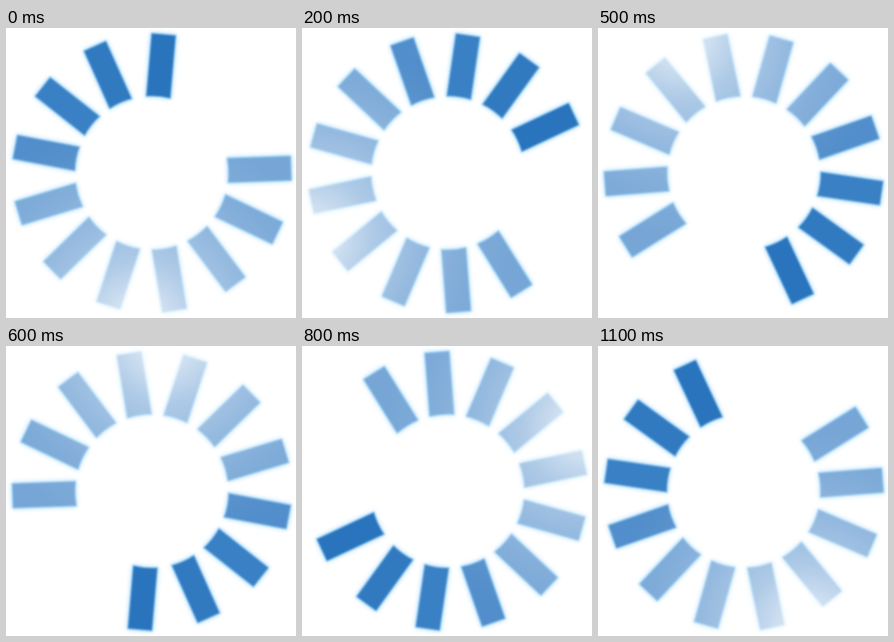
Animation, 363 px wide and 363 px high, one loop 1200 ms. Source, as an HTML page with a canvas:

```html
<!DOCTYPE html>
<html lang="en">
<head>
<meta charset="utf-8">
<title>Loading spinner</title>
<style>
  html, body { margin: 0; width: 100%; height: 100%; overflow: hidden; background: #fff; }
  canvas { display: block; filter: blur(1.1px); }
</style>
</head>
<body>
<canvas id="stage" width="363" height="363"></canvas>
<script>
const ctx = document.getElementById('stage').getContext('2d');
const STEP_MS = 100, STEPS = 12, BARS = 11;
const INNER = 96, OUTER = 174.5, HALF = 15.5, FADE = 250;
const HEAD_COLORS = ['#2a74bd', '#327ac0', '#3a80c4', '#528ecb'];
const TAIL_COLOR = '#77a6d6';
const rad = deg => deg * Math.PI / 180;

// Degrees clockwise from the top; the head sits slightly ahead of the even spacing.
const barAngle = i => i ? 3.4 - 27.54 * i : 4.9;

// Whitening around the rim, opposite the head
const spot = rad(barAngle(0) + 180);
const sx = 190 * Math.sin(spot), sy = -190 * Math.cos(spot);
const fade = ctx.createRadialGradient(sx, sy, 0, sx, sy, FADE);
[[0, .78], [.16, .63], [.32, .4], [.48, .27], [.64, .15], [.8, .06], [1, 0]]
  .forEach(([at, alpha]) => fade.addColorStop(at, `rgba(255,255,255,${alpha})`));

function traceBar(angle) {
  const half = Math.asin(HALF / INNER);
  ctx.save();
  ctx.rotate(rad(angle));
  ctx.beginPath();
  ctx.arc(0, 0, INNER, -Math.PI / 2 - half, -Math.PI / 2 + half);
  ctx.lineTo(HALF, -OUTER);
  ctx.lineTo(-HALF, -OUTER);
  ctx.closePath();
  ctx.restore();
}

function drawBar(i) {
  traceBar(barAngle(i));
  ctx.fillStyle = HEAD_COLORS[i] || TAIL_COLOR;
  ctx.shadowColor = 'rgba(125,200,250,.8)';
  ctx.shadowBlur = 6;
  ctx.fill();
  ctx.shadowColor = 'transparent';
  ctx.strokeStyle = 'rgba(150,208,246,.6)';
  ctx.lineWidth = 2;
  ctx.stroke();
}

function drawFade() {
  ctx.beginPath();
  ctx.arc(sx, sy, FADE, 0, 2 * Math.PI);
  ctx.fillStyle = fade;
  ctx.fill();
}

function draw(now) {
  const step = Math.floor(now / STEP_MS) % STEPS;
  ctx.setTransform(1, 0, 0, 1, 0, 0);
  ctx.fillStyle = '#fff';
  ctx.fillRect(0, 0, 363, 363);
  ctx.translate(182.5, 181.5);
  ctx.rotate(rad(step * 360 / STEPS));
  for (let i = 0; i < BARS; i++) drawBar(i);
  drawFade();
}

function tick() {
  draw(performance.now());
  requestAnimationFrame(tick);
}
tick();
</script>
</body>
</html>
```
